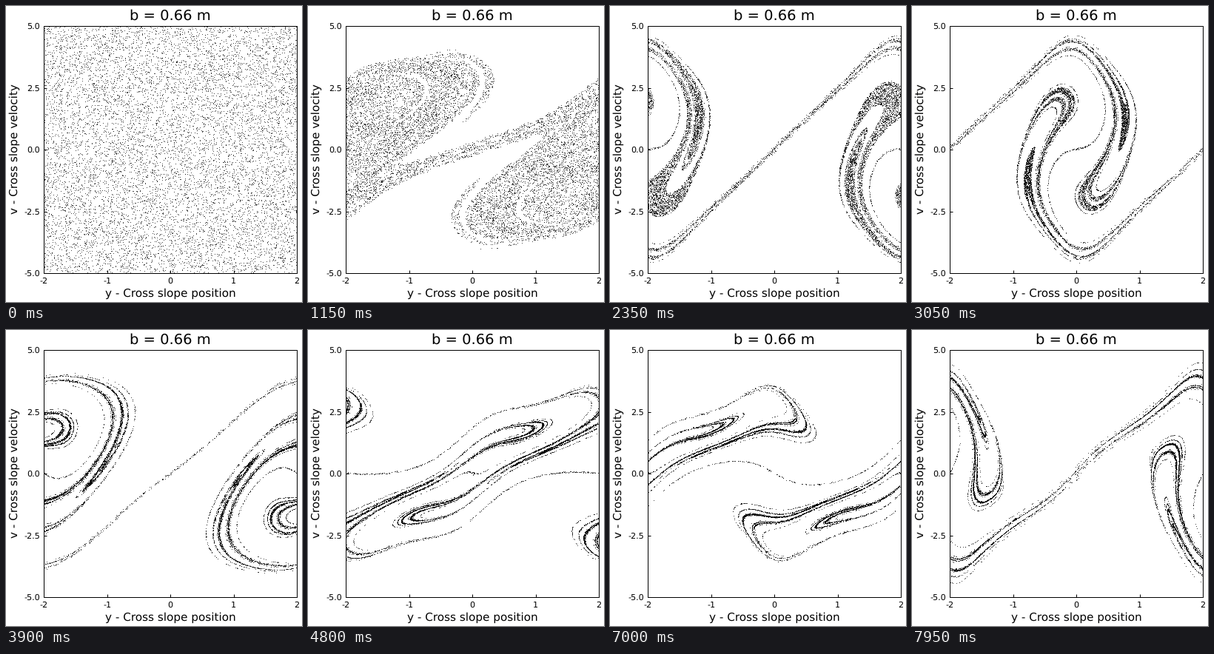
A matplotlib script that plays this animation: 400 by 400 pixels, repeating every 8 s.

```python
import numpy as np
import matplotlib.pyplot as plt
from matplotlib.animation import FuncAnimation

SIZE = 400
FRAMES, INTERVAL = 160, 50
DT, SUBSTEPS = 0.1, 4
POINTS = 10000

# Sled sliding at constant speed over a slope covered with moguls
A, B, C = 0.25, 0.66, 0.5
P, Q = 2 * np.pi / 10, 2 * np.pi / 4
GRAVITY, SPEED = 9.81, 3.5


def accel(t, y, v):
    px, qy = P * SPEED * t, Q * y
    cx, sx = np.cos(px), np.sin(px)
    cy, sy = np.cos(qy), np.sin(qy)
    hx = -A + B * P * sx * cy
    hy = B * Q * cx * sy
    hxx = B * P * P * cx * cy
    hxy = -B * P * Q * sx * sy
    hyy = B * Q * Q * cx * cy
    force = GRAVITY + hxx * SPEED**2 + 2 * hxy * SPEED * v + hyy * v * v
    return -force / (1 + hx * hx + hy * hy) * hy - C * v


def rk4(t, y, v, h):
    k1, a1 = v, accel(t, y, v)
    k2 = v + h / 2 * a1
    a2 = accel(t + h / 2, y + h / 2 * k1, k2)
    k3 = v + h / 2 * a2
    a3 = accel(t + h / 2, y + h / 2 * k2, k3)
    k4 = v + h * a3
    a4 = accel(t + h, y + h * k3, k4)
    return (y + h / 6 * (k1 + 2 * k2 + 2 * k3 + k4),
            v + h / 6 * (a1 + 2 * a2 + 2 * a3 + a4))


def simulate():
    rng = np.random.default_rng(7)
    y = rng.uniform(-2, 2, POINTS)
    v = rng.uniform(-5, 5, POINTS)
    h = DT / SUBSTEPS
    states = []
    for i in range(FRAMES):
        states.append(((y + 2) % 4 - 2, v))
        for k in range(SUBSTEPS):
            y, v = rk4(i * DT + k * h, y, v, h)
    return states


states = simulate()

plt.rcParams.update({"font.family": "DejaVu Sans", "text.hinting": "none",
                     "toolbar": "None"})
fig = plt.figure(figsize=(4, 4), dpi=100, facecolor="white")
ax = fig.add_axes([51 / SIZE, 1 - 361 / SIZE, 342 / SIZE, 334 / SIZE])
ax.set(xlim=(-2, 2), ylim=(-5, 5))
for spine in ax.spines.values():
    spine.set_linewidth(0.72)

ax.set_xticks([-2, -1, 0, 1, 2], ["-2", "-1", "0", "1", "2"])
ax.set_yticks([-5, -2.5, 0, 2.5, 5], ["-5.0", "-2.5", "0.0", "2.5", "5.0"])
ax.tick_params(direction="in", length=3.2, width=0.72, labelsize=8)
ax.tick_params(axis="x", pad=4.3)
ax.tick_params(axis="y", pad=3.8)


def label(x, y, text, size, rotation=0):
    fig.text(x / SIZE, 1 - y / SIZE, text, size=size, rotation=rotation,
             ha="center", va="baseline", rotation_mode="anchor")


label(221.5, 19, "b = 0.66 m", 14)
label(222, 393, "y - Cross slope position", 11)
label(16, 193.5, "v - Cross slope velocity", 11, 90)

cloud, = ax.plot([], [], ",", color="black", alpha=0.7)


def draw(i):
    cloud.set_data(*states[i])
    return cloud,


anim = FuncAnimation(fig, draw, frames=FRAMES, interval=INTERVAL,
                     init_func=lambda: draw(0), repeat=True, repeat_delay=0)
plt.show()
```
